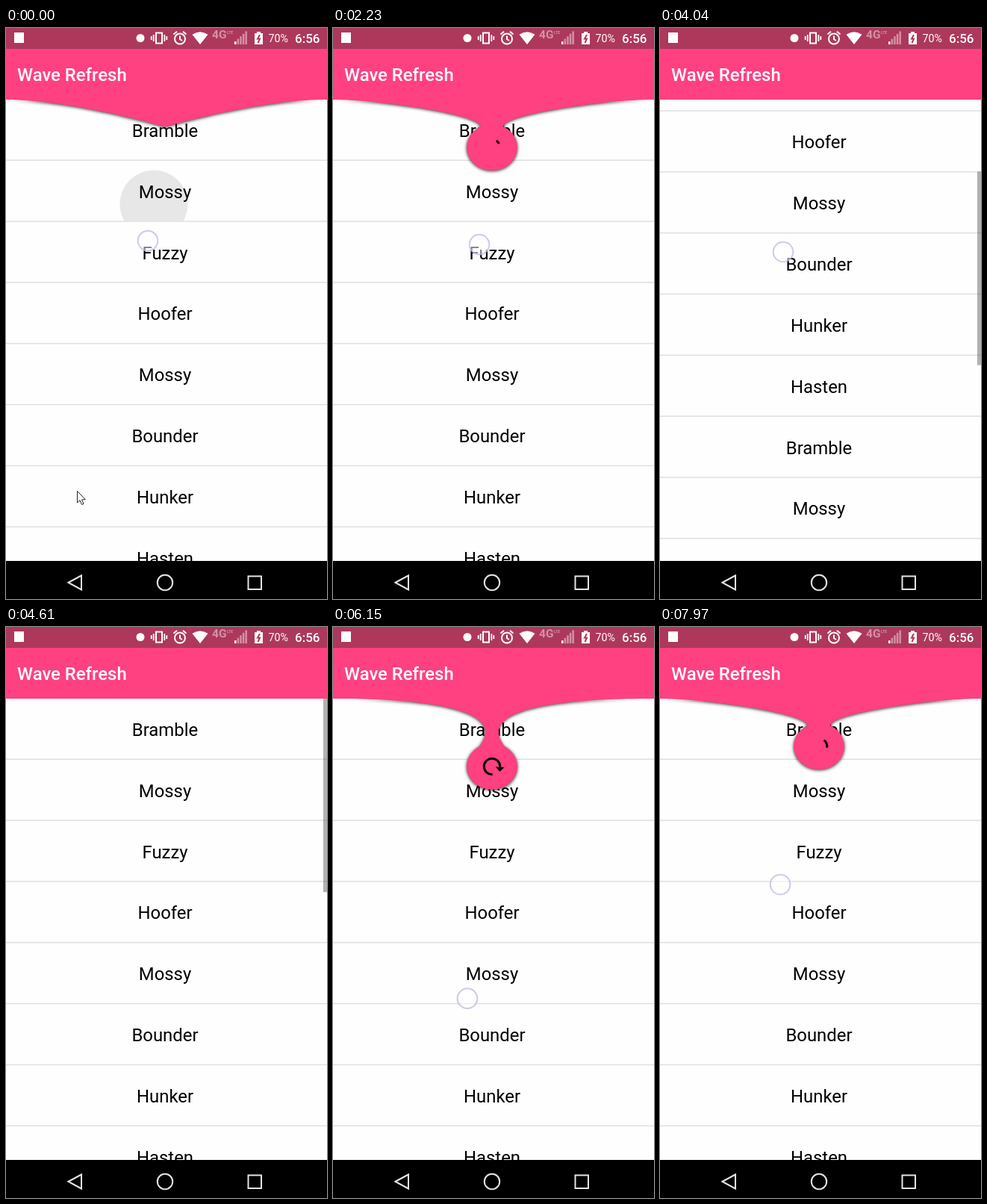
Write an HTML page with a canvas that moves like this. It is 430 by 765 pixels and loops after 8 s.

```html
<!DOCTYPE html>
<html lang="en">
<head>
<meta charset="utf-8">
<title>Wave Refresh</title>
<style>
  html, body { margin: 0; width: 100%; height: 100%; overflow: hidden; background: #fefefe; }
  canvas { display: block; }
</style>
</head>
<body>
<canvas id="stage" width="430" height="765"></canvas>
<script>
const ctx = document.getElementById('stage').getContext('2d');
const LOOP = 8000, W = 430, MID = 213, BAR = 96, ROW = 81.85, ROWS = 18, VIEW = 618;
const PINK = '#ff4081', PLUM = '#ad385c', FONT = 'Roboto, sans-serif';
const NAMES = ['Bramble', 'Mossy', 'Fuzzy', 'Hoofer', 'Mossy', 'Bounder', 'Hunker', 'Hasten'];

// path: [time, y] turning points of the finger; x follows drift (per ms) and lean (per px).
// zero: the height at which the drop forms.
const PULL_A = { x: 190, drift: 0.0029, lean: -0.086, zero: 284,
  path: [[0, 285], [700, 361], [880, 361], [1600, 417], [2500, 236], [3150, 190]] };
const DRAG = { x: 165, drift: 0, lean: 0,
  path: [[3550, 560], [3950, 300], [4130, 300], [4480, 548]] };
const PULL_B = { x: 192.7, drift: -0.0104, lean: 0, zero: 323.5,
  path: [[4930, 225], [5700, 453], [6130, 505], [6920, 228], [7700, 391], [8000, 340]] };

const clamp = v => Math.min(1, Math.max(0, v));
const lerp = (a, b, k) => a + (b - a) * k;
const rad = deg => deg * Math.PI / 180;

function touchAt(t) {
  for (const g of [PULL_A, DRAG, PULL_B]) {
    const i = g.path.findIndex(([time]) => time > t);
    if (i < 1) continue;
    const [t0, y0] = g.path[i - 1], [t1, y1] = g.path[i];
    const y = lerp(y0, y1, (t - t0) / (t1 - t0));
    return { g, y, x: g.x + g.drift * (t - g.path[0][0]) + g.lean * (y - g.path[0][1]) };
  }
  return null;
}

function box(x, y, w, h, color) {
  ctx.fillStyle = color;
  ctx.fillRect(x, y, w, h);
}

function disc(x, y, r, color) {
  ctx.fillStyle = color;
  ctx.beginPath();
  ctx.arc(x, y, r, 0, 7);
  ctx.fill();
}

function ring(x, y, r) {
  ctx.beginPath();
  ctx.arc(x, y, r, 0, 7);
  ctx.stroke();
}

function line(points, closed = false) {
  ctx.beginPath();
  points.forEach(([x, y]) => ctx.lineTo(x, y));
  if (closed) ctx.closePath();
  ctx.stroke();
}

function pen(color, width) {
  ctx.strokeStyle = color;
  ctx.lineWidth = width;
}

function label(str, x, y, size, color, weight = 400, align = 'left') {
  ctx.font = `${weight} ${size}px ${FONT}`;
  ctx.fillStyle = color;
  ctx.textAlign = align;
  ctx.fillText(str, x, y);
}

function drawList(scroll, t) {
  box(0, 0, W, 765, '#fefefe');
  if (t < 300) {
    ctx.save();
    ctx.beginPath();
    ctx.rect(0, 178, W, 80.5);
    ctx.clip();
    disc(198, 236, 45.5 + t * 0.03, `rgba(0,0,0,${0.09 * (1 - t / 300)})`);
    ctx.restore();
  }
  for (let i = 0; i < ROWS; i++) {
    const y = BAR + i * ROW - scroll;
    label(NAMES[i % NAMES.length], MID, y + 49.8, 23.9, '#000', 400, 'center');
    box(0, y + 80.5, W, 1.4, '#dedede');
  }
}

function drawScrollbar(scroll, t) {
  const alpha = clamp((t - 3590) / 60) * clamp((5150 - t) / 240);
  const scale = VIEW / (ROW * ROWS);
  box(425, BAR + scroll * scale, 5, VIEW * scale, `rgba(0,0,0,${0.3 * alpha})`);
}

// Curves are given in stage widths from the left end of the bar; side 1 mirrors them.
function curve(side, ...pts) {
  const flat = pts.flatMap(([x, y]) => [MID + (side ? 0.5 - x : x - 0.5) * W, BAR + y * W]);
  ctx.bezierCurveTo(...flat);
}

function wavePath(depth) {
  const d = depth / W, inner = [0.388, 0.62 * d], outer = [0.1655, 0];
  ctx.moveTo(MID - W / 2, BAR);
  curve(0, outer, inner, [0.5, d]);
  curve(1, inner, outer, [0, 0]);
}

// k stretches the neck from short (0) to long (1).
function dropPath(k) {
  const outer = [0.1655, 0], pull = [0.5237 + 0.0672 * k, 0.0553 * (1 - k)];
  const neck = [0.4557, 0.0936 + 0.0706 * k];
  const hip = [0.3908 + 0.0033 * k, 0.1302 + 0.0759 * k];
  const low = 0.2173 + 0.0716 * k, foot = [0.4303, low];
  ctx.moveTo(MID - W / 2, BAR);
  curve(0, outer, pull, neck);
  curve(0, hip, foot, [0.5, low]);
  curve(1, foot, hip, neck);
  curve(1, pull, outer, [0, 0]);
}

function drawIcon(cy, pull) {
  const sweep = Math.min(277, 15.6 + 2.07 * pull);
  const start = -58 + 148 * (sweep / 280) ** 2;
  const end = rad(start + sweep), r = 10.7, tip = 6 * clamp((sweep - 200) / 75);
  pen('#000', 3);
  ctx.beginPath();
  ctx.arc(MID, cy, r, rad(start), end);
  ctx.stroke();
  ctx.save();
  ctx.translate(MID, cy);
  ctx.rotate(end);
  ctx.fillStyle = '#000';
  ctx.beginPath();
  ctx.moveTo(r - tip, 0);
  ctx.lineTo(r + tip, 0);
  ctx.lineTo(r, tip);
  ctx.fill();
  ctx.restore();
}

function drawWave(pull) {
  const depth = 36.5 * clamp(1 + pull / 85);
  if (!depth) return;
  const grow = clamp((pull - 1.5) / 4), k = Math.max(0, (pull - 43) / 151);
  const cy = lerp(112, 160, grow) + 31 * k;
  ctx.save();
  ctx.shadowColor = 'rgba(0,0,0,0.85)';
  ctx.shadowBlur = 4;
  ctx.shadowOffsetY = 0.8;
  ctx.fillStyle = PINK;
  ctx.beginPath();
  if (grow < 1) wavePath(depth);
  else dropPath(k);
  ctx.closePath();
  ctx.moveTo(MID + 34 * grow, cy);
  ctx.ellipse(MID, cy, 34 * grow, 31 * grow, 0, 0, 2 * Math.PI, true);
  ctx.fill();
  ctx.restore();
  if (grow === 1) drawIcon(cy, pull);
}

function drawStatus() {
  box(0, 0, W, 28, PLUM);
  box(0, 28, W, BAR - 28, PINK);
  label('Wave Refresh', 15, 71, 23.9, '#fff', 500);
  box(11, 6, 13, 14, '#fff');
  disc(180, 13.5, 5.5, '#fff');

  // Vibrate and alarm
  pen('#fff', 2);
  ctx.strokeRect(201, 6.5, 8, 14);
  ring(233, 14.5, 7);
  line([[233, 10.5], [233, 15], [236, 17]]);
  for (const s of [-1, 1]) {
    box(205 + s * 7.3 - 0.9, 9, 1.8, 9, '#fff');
    box(205 + s * 10.3 - 0.9, 11, 1.8, 5, '#fff');
    line([[233 + s * 4, 4.8], [233 + s * 8.5, 8.5]]);
  }

  // Wi-Fi
  ctx.beginPath();
  ctx.moveTo(260, 22);
  ctx.lineTo(249.5, 8.8);
  ctx.quadraticCurveTo(260, 1.8, 270.5, 8.8);
  ctx.fill();

  // Signal
  const dim = '#d391a7';
  label('4G', 276, 14, 15.5, dim, 700);
  label('LTE', 296, 8, 5, dim, 700);
  for (let i = 0; i < 5; i++) {
    const h = 4 + i * 3.4;
    box(306 + i * 3.6, 22 - h, 2.5, h, i ? dim : '#fff');
  }

  // Battery
  box(333, 7, 11, 15, '#fff');
  box(336, 5, 5, 2, '#fff');
  pen(PLUM, 2);
  line([[340, 9], [337, 14.5], [340, 14.5], [337.5, 20]]);
  label('70%', 351.5, 19, 14.3, '#fff');
  label('6:56', 387, 20, 17, '#fff', 500);
}

function drawNav() {
  box(0, 714, W, 51, '#000');
  pen('#e4e4e4', 2);
  line([[83.5, 743], [101, 733.5], [101, 752.5]], true);
  ring(MID, 743, 10.2);
  ctx.strokeRect(324.5, 734.5, 17.5, 17.5);
}

function drawTouch({ x, y }) {
  disc(x, y, 13.5, 'rgba(255,255,255,0.5)');
  pen('rgba(190,184,226,0.75)', 2);
  ring(x, y, 13.3);
}

function drawPointer() {
  pen('#222', 1);
  line([[95.5, 620.5], [95.5, 636], [99, 632.8], [101.5, 638.5], [104, 637.4], [101.5, 632], [106.3, 631.6]], true);
}

function render(t) {
  const touch = touchAt(t);
  const scroll = touch && touch.g === DRAG ? Math.max(0, 530 - touch.y) : 0;
  drawList(scroll, t);
  drawScrollbar(scroll, t);
  if (touch && touch.g.zero) drawWave(touch.y - touch.g.zero);
  drawStatus();
  drawNav();
  if (touch) drawTouch(touch);
  if (t < 60) drawPointer();
}

function tick() {
  render(performance.now() % LOOP);
  requestAnimationFrame(tick);
}
tick();
</script>
</body>
</html>
```
